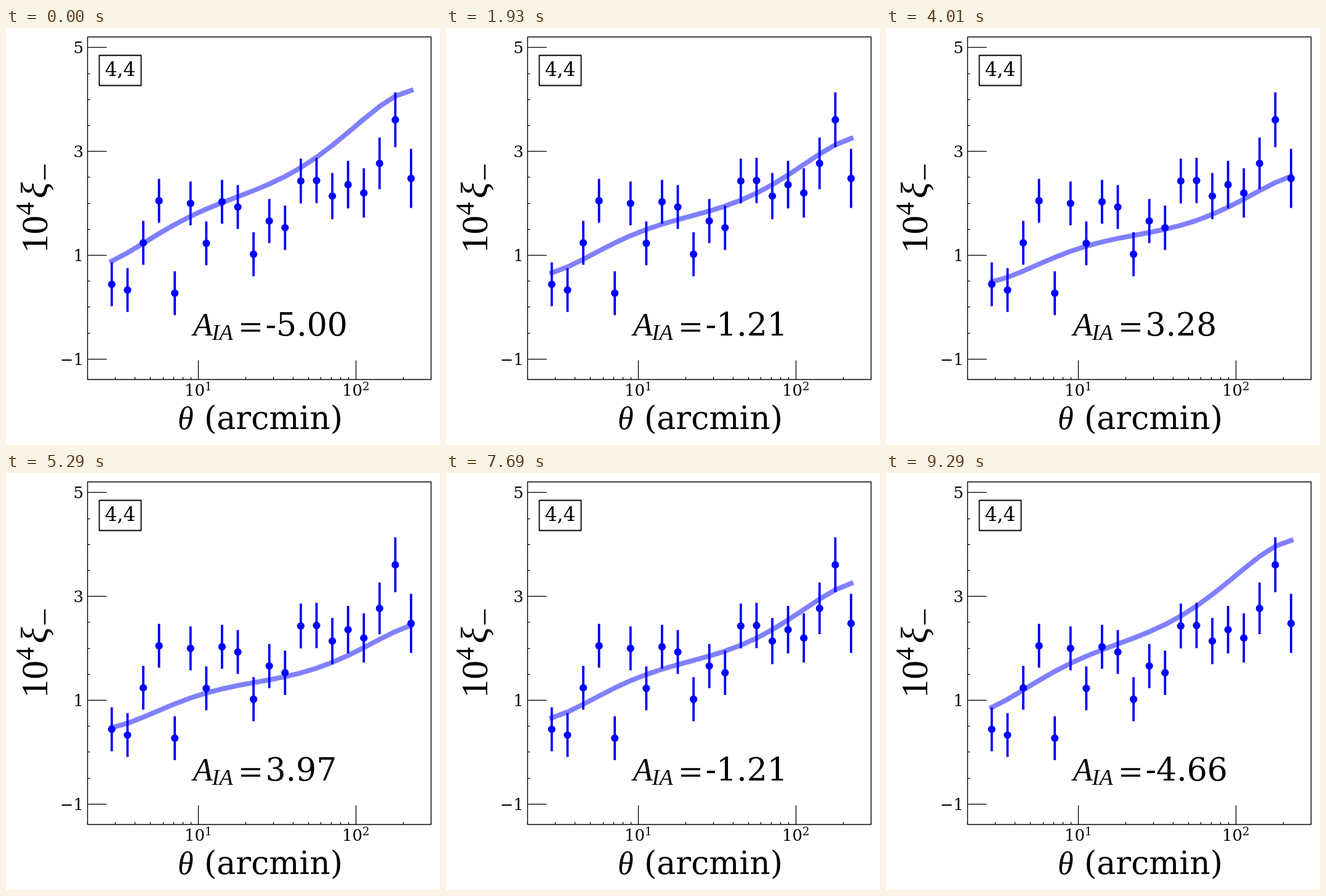
An HTML page with a canvas that plays this animation: 705x678 px, repeating every 9.45 s.

```html
<!DOCTYPE html>
<html lang="en">
<head>
<meta charset="utf-8">
<title>Correlation function</title>
<style>
html, body { margin: 0; width: 100%; height: 100%; overflow: hidden; background: #fff; }
canvas { display: block; width: 705px; height: 678px; }
</style>
</head>
<body>
<canvas id="plot" width="705" height="678"></canvas>
<script>
const ctx = document.getElementById('plot').getContext('2d');
const SERIF = '"DejaVu Serif", serif';
const MATH = '"Liberation Serif", serif';
const BLUE = '#0000ff';
const LARGE = 52, SMALL = 26;
const LOOP = 9450, HOLD = 330, STEP = 160, LAST = 29;
const FRAME = { left: 132.5, top: 14.5, right: 690.5, bottom: 571.5 };

const xLog = v => 312 + 256.4 * (Math.log10(v) - 1);
const yLin = v => 453.9 - 84.4 * v;
const xBin = i => 171.8 + 25.59 * i;
const snap = v => Math.floor(v) + 0.5;
const amplitude = i => -5 + 10 * i / LAST;

// One irregular measurement per angular bin
const measured = [0.44, 0.33, 1.24, 2.05, 0.27, 2.0, 1.23, 2.03, 1.93, 1.02,
  1.66, 1.53, 2.43, 2.44, 2.14, 2.36, 2.2, 2.77, 3.61, 2.48];
const BINS = measured.length;
const errorAt = i => 0.422 + 0.147 * (i / (BINS - 1)) ** 6;

// Polynomial through a few knots
function interpolate(knots, values, x) {
  return knots.reduce((sum, k, i) => sum + knots.reduce(
    (term, other, j) => i === j ? term : term * (x - other) / (k - other), values[i]), 0);
}

// The model is smooth along the bins and quadratic in the amplitude
const binKnots = [0, 2, 7, 12, 17, 19];
const ampKnots = [0, 11, 26].map(amplitude);
const keyCurves = [
  [0.887, 1.231, 2.013, 2.688, 3.867, 4.175],
  [0.662, 0.923, 1.598, 2.06, 2.949, 3.251],
  [0.473, 0.674, 1.219, 1.527, 2.173, 2.445]
];
const model = (bin, a) =>
  interpolate(ampKnots, keyCurves.map(c => interpolate(binKnots, c, bin)), a);

function line(x1, y1, x2, y2, width, color = '#000') {
  ctx.strokeStyle = color;
  ctx.lineWidth = width;
  ctx.lineCap = 'butt';
  ctx.beginPath();
  ctx.moveTo(x1, y1);
  ctx.lineTo(x2, y2);
  ctx.stroke();
}

function box(x, y, w, h, width) {
  ctx.strokeStyle = '#000';
  ctx.lineWidth = width;
  ctx.strokeRect(x, y, w, h);
}

function text(str, x, y, size, family = SERIF, align = 'left', style = '') {
  ctx.fillStyle = '#000';
  ctx.font = `${style} ${size}px ${family}`;
  ctx.textAlign = align;
  ctx.fillText(str, x, y);
}

const italic = (str, x, y, size) => text(str, x, y, size, MATH, 'left', 'italic');

function drawAxes() {
  const { left, top, right, bottom } = FRAME;
  box(left, top, right - left, bottom - top, 1.4);

  for (let v = -1; v <= 5; v += 0.5) {
    const major = Math.abs(v % 2) === 1;
    const y = snap(yLin(v));
    line(left, y, left + (major ? 31 : 4), y, 1.3);
    if (major) text(String(v).replace('-', '\u2212'), 126, yLin(v) + 9.5, SMALL, SERIF, 'right');
  }
  for (let power = 0; power <= 2; power++) {
    for (let n = 1; n < 10; n++) {
      const x = snap(xLog(n * 10 ** power));
      if (x < left || x > right) continue;
      line(x, bottom, x, bottom - (n === 1 ? 31 : 4), 1.3);
      if (n === 1) {
        text('10', x - 22.5, 598, SMALL);
        text(power, x + 10.5, 588.5, 0.7 * SMALL);
      }
    }
  }
}

function drawLabels() {
  box(151.5, 44.5, 68, 49, 1.8);
  text('4,4', 185.5, 77.5, 31.2, SERIF, 'center');

  italic('\u03b8', 279, 652, LARGE);
  text('(arcmin)', 322, 652, LARGE);

  ctx.save();
  ctx.translate(66.5, 366);
  ctx.rotate(-Math.PI / 2);
  text('10', 0, 0, 61, MATH);
  text('4', 61.5, -22, 42.7, MATH);
  italic('\u03be', 89, 0, 61);
  ctx.fillRect(119.5, -4.7, 24.5, 2.5);
  ctx.restore();
}

function drawModel(a) {
  ctx.strokeStyle = '#8080ff';
  ctx.lineWidth = 8;
  ctx.lineCap = 'square';
  ctx.lineJoin = 'round';
  ctx.beginPath();
  for (let i = 0; i < BINS; i++) ctx.lineTo(xBin(i), yLin(model(i, a)));
  ctx.stroke();
}

function drawData() {
  ctx.fillStyle = BLUE;
  measured.forEach((v, i) => {
    const x = xBin(i), e = errorAt(i);
    line(x, yLin(v - e), x, yLin(v + e), 3.8, BLUE);
    ctx.beginPath();
    ctx.arc(x, yLin(v), 6.1, 0, 2 * Math.PI);
    ctx.fill();
  });
}

function drawAmplitude(a) {
  italic('A', 304, 500, LARGE);
  italic('IA', 334.5, 507, 0.7 * LARGE);
  [479.8, 490.4].forEach(y => ctx.fillRect(382, y, 31, 3.4));
  text(a.toFixed(2), 421.5, 500, LARGE);
}

function draw(now) {
  const t = now % LOOP;
  const i = t < HOLD ? 0 : 1 + Math.floor((t - HOLD) / STEP);
  const a = amplitude(Math.min(i, 2 * LAST - i));
  ctx.fillStyle = '#fff';
  ctx.fillRect(0, 0, 705, 678);
  drawModel(a);
  drawData();
  drawAxes();
  drawLabels();
  drawAmplitude(a);
}

let start;
function tick(now) {
  start ??= now;
  draw(now - start);
  requestAnimationFrame(tick);
}
requestAnimationFrame(tick);
</script>
</body>
</html>
```
